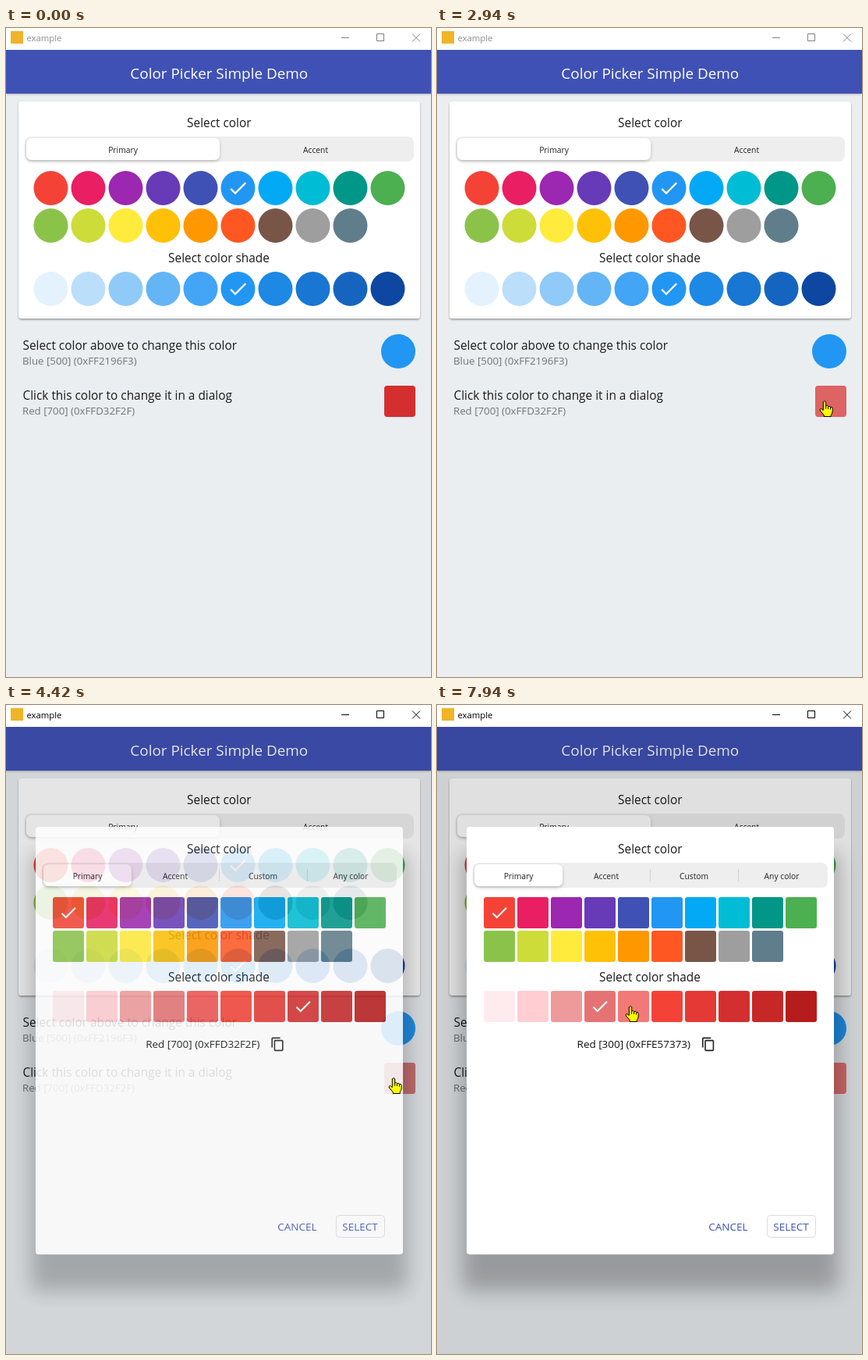
Animation of 545 by 831 pixels, one loop 8000 ms. Source, as an HTML page:

```html
<!DOCTYPE html>
<html lang="en">
<head>
<meta charset="utf-8">
<title>Color Picker Simple Demo</title>
<style>
  html, body { margin: 0; width: 100%; height: 100%; overflow: hidden; background: #eaeef1; }
  svg { display: block; width: 545px; height: 831px; font-family: "Open Sans", "Noto Sans", sans-serif; }
  .title { font-size: 18.9px; font-weight: 500; fill: #fff; }
  .h { font-size: 15.4px; fill: #1a1a1a; }
  .sub { font-size: 13.25px; fill: #727577; }
  .tab { font-size: 10.3px; fill: #222; }
  .btn { font-size: 13.5px; fill: #3f51b5; }
  .code { font-size: 13.45px; fill: #111; }
  .mid { text-anchor: middle; }
</style>
</head>
<body>
<svg id="stage" viewBox="0 0 545 831"></svg>
<script>
const LOOP = 8000;
const STEP = 78; // ms between screen updates
const OPEN = 4120; // the dialog starts to fade in
const hex = s => s.split(' ').map(c => '#' + c);
const PRIMARY = hex('F44336 E91E63 9C27B0 673AB7 3F51B5 2196F3 03A9F4 00BCD4 009688 4CAF50 ' +
  '8BC34A CDDC39 FFEB3B FFC107 FF9800 FF5722 795548 9E9E9E 607D8B');
const BLUES = hex('E3F2FD BBDEFB 90CAF9 64B5F6 42A5F5 2196F3 1E88E5 1976D2 1565C0 0D47A1');
const REDS = hex('FFEBEE FFCDD2 EF9A9A E57373 EF5350 F44336 E53935 D32F2F C62828 B71C1C');

const easeOut = p => k => 1 - (1 - k) ** p;
const easeIn = p => k => k ** p;
const linear = k => k;

// Each pointer move starts where the one before it ended.
const ENTRY = { x: 533, y: 553 };
const MOVES = [
  { at: 1040, steps: 6, x: 248, y: 488, ease: easeOut(1.3) },
  { at: 1508, steps: 4, x: 181, y: 479, ease: easeOut(1.5) },
  { at: 2070, steps: 11, x: 497, y: 478, ease: easeOut(1.5) },
  { at: 5732, steps: 5, x: 125, y: 388, ease: easeIn(2.1) },
  { at: 6448, steps: 5, x: 208, y: 388, ease: linear },
  { at: 7552, steps: 5, x: 248, y: 386, ease: linear }
];

const text = (x, y, cls, s, more = '') => `<text x="${x}" y="${y}" class="${cls}" ${more}>${s}</text>`;
const rect = (x, y, w, h, r, fill, more = '') =>
  `<rect x="${x}" y="${y}" width="${w}" height="${h}" rx="${r}" fill="${fill}" ${more}/>`;
const place = (x, y, k) => `translate(${x} ${y}) scale(${k}) translate(-12 -12)`;
const tick = (x, y, k, more = '') =>
  `<path d="M9 16.17L4.83 12 3.41 13.41 9 19 21 7 19.59 5.59z" fill="#fff" transform="${place(x, y, k)}" ${more}/>`;
const grid = (list, pitch, cell) =>
  list.map((c, i) => cell(c, pitch * (i % 10), pitch * Math.floor(i / 10))).join('');
const dots = (list, y) => grid(list, 48, (c, dx, dy) =>
  `<circle cx="${57.5 + dx}" cy="${y + dy}" r="22" fill="${c}"/>`);
const tiles = (list, y) => grid(list, 43, (c, dx, dy) => rect(60 + dx, y + dy, 40, 40, 3, c));

const shadow = (id, dy, blur, alpha) =>
  `<filter id="${id}" x="-10%" y="-30%" width="120%" height="180%">
    <feDropShadow dx="0" dy="${dy}" stdDeviation="${blur}" flood-opacity="${alpha}"/></filter>`;

const filters = `<defs>
  ${shadow('bar', 1, 1, 0.28)}${shadow('card', 1.5, 1.3, 0.38)}${shadow('lift', 2, 2, 0.22)}
  <filter id="blur" x="-20%" y="-20%" width="140%" height="140%"><feGaussianBlur stdDeviation="13"/></filter>
</defs>`;

const page = `
  ${rect(0, 0, 545, 831, 0, '#eaeef1')}
  ${rect(0, 28, 545, 56, 0, '#3f51b5', 'filter="url(#bar)"')}
  ${text(273.3, 65, 'title mid', 'Color Picker Simple Demo')}
  ${rect(16, 94, 515, 278, 4, '#fff', 'filter="url(#card)"')}
  ${text(273.3, 127, 'h mid', 'Select color')}
  ${rect(24, 139, 499, 32, 8, '#eee')}
  ${rect(26, 141, 248, 28, 7, '#fff', 'filter="url(#lift)"')}
  ${text(150, 160, 'tab mid', 'Primary')}${text(397, 160, 'tab mid', 'Accent')}
  ${dots(PRIMARY, 205)}${tick(297.5, 205, 1.18)}
  ${text(273, 300, 'h mid', 'Select color shade')}
  ${dots(BLUES, 334)}${tick(297.5, 334, 1.18)}
  ${text(21.5, 412, 'h', 'Select color above to change this color')}
  ${text(21, 431, 'sub', 'Blue [500] (0xFF2196F3)')}
  <circle cx="503" cy="414" r="22" fill="#2196f3"/>
  ${text(21.5, 476, 'h', 'Click this color to change it in a dialog')}
  ${text(21, 495, 'sub', '', 'id="rowCode"')}
  ${rect(485, 458, 40, 40, 4, '#d32f2f', 'id="box"')}
  ${rect(485, 458, 40, 40, 4, '#fff', 'id="boxHover"')}`;

const titleBar = `
  ${rect(0, 0, 545, 28, 0, '#fff')}
  ${rect(6, 4, 16, 16, 0, '#f0b429')}
  ${text(26.5, 17, '', 'example', 'id="winName" font-size="11.3"')}
  <path id="winKeys" fill="none" d="M430 12.5h10M475.5 7.5h9v9h-9zM521 7.5l10 10M531 7.5l-10 10"/>`;

const tabs = ['Primary', 'Accent', 'Custom', 'Any color'];
const dialog = `<g id="dialog">
  ${rect(32, 190, 483, 560, 6, '#000', 'opacity=".26" filter="url(#blur)"')}
  ${rect(38, 156, 471, 547.5, 4, '#fff')}
  ${text(273.3, 190, 'h mid', 'Select color')}
  ${rect(46, 202, 455, 32, 8, '#eee')}
  ${rect(48, 204, 113, 28, 7, '#fff', 'filter="url(#lift)"')}
  <path d="M273.5 210v16M386.5 210v16" stroke="#d2d2d2"/>
  ${tabs.map((s, i) => text(104.5 + 112.5 * i, 223, 'tab mid', s)).join('')}
  ${tiles(PRIMARY, 246)}${tick(80, 266, 1.08)}
  ${text(273, 354, 'h mid', 'Select color shade')}
  ${tiles(REDS, 366)}
  ${rect(60, 366, 40, 40, 3, '#fff', 'id="tileHover"')}
  ${tick(0, 0, 1, 'id="pickTick"')}
  ${text(252.3, 439, 'code mid', '', 'id="code"')}
  <path id="copy" fill="#222" d="M16 1H4c-1.1 0-2 .9-2 2v14h2V3h12V1zm3 4H8c-1.1 0-2 .9-2 2v14c0 1.1.9 2 2 2h11c1.1 0 2-.9 2-2V7c0-1.1-.9-2-2-2zm0 16H8V7h11v14z"/>
  ${text(348.3, 673, 'btn', 'CANCEL')}
  ${rect(423.5, 653.5, 62, 28, 4, 'none', 'stroke="#dcdce0"')}
  ${text(431.3, 673, 'btn', 'SELECT')}
</g>`;

const pointer = `<g fill="#ff0" stroke="#000" stroke-linejoin="round">
  <path id="arrow" d="M.5.5V15.5L4 12.2 6.7 18 9.2 16.9 6.6 11.3H11.5Z"/>
  <g id="hand">
    <path d="M-1.7 1.2Q0-1 1.7 1.2V6.3Q3.4 5.2 4.6 7 6.3 6.2 7.5 7.8 10.2 7.3 10.2 10V13.5Q10 16 8.3 17.8V20H-.8V18.1L-5.6 12.5Q-6.6 10.2-4.4 9.9L-1.7 12Z"/>
    <path d="M1.7 6.3V10.3M4.6 7V10.6M7.5 7.8V11" fill="none"/>
  </g>
</g>`;

const $ = id => document.getElementById(id);
const set = (id, attrs) => { for (const k in attrs) $(id).setAttribute(k, attrs[k]); };

$('stage').innerHTML = filters + page + rect(0, 28, 545, 803, 0, '#000', 'id="dim"') +
  titleBar + dialog + pointer;

const stepsSince = (t, start) => Math.floor((t - start) / STEP + 0.2);

function pointAt(t) {
  let i = MOVES.length - 1;
  while (i > 0 && MOVES[i].at > t) i--;
  const from = MOVES[i - 1] || ENTRY, to = MOVES[i];
  const k = to.ease(Math.max(0, Math.min(1, stepsSince(t, to.at) / to.steps)));
  return { x: from.x + (to.x - from.x) * k, y: from.y + (to.y - from.y) * k };
}

// What lies under the pointer: a shade index, 'box' or null.
function targetAt(t) {
  const { x, y } = pointAt(t);
  if (x >= 485 && x <= 525 && y >= 458 && y <= 498) return 'box';
  const i = Math.floor((x - 60) / 43);
  const inside = y >= 366 && y <= 406 && i >= 0 && i < 10 && x - 60 - 43 * i <= 40;
  return inside ? i : null;
}

function drawColors(t, fade) {
  const pick = t < 6370 ? 7 : t < 7160 ? 1 : 3;
  const label = `Red [${pick * 100}] (0xFF${REDS[pick].slice(1)})`;
  $('code').textContent = $('rowCode').textContent = label;
  const right = 252.3 + $('code').getComputedTextLength() / 2;
  set('copy', { transform: `translate(${right + 13.4} 424.8) scale(.8)` });
  set('box', { fill: REDS[pick] });
  set('pickTick', { transform: place(80 + 43 * pick, 386, 1.08), fill: pick < 3 ? '#000' : '#fff' });

  // Highlights trail the pointer by one update.
  const lit = targetAt(t - STEP);
  const pressed = fade > 0;
  set('boxHover', {
    fill: pressed ? '#ccc' : '#fff',
    opacity: lit !== 'box' || fade === 1 ? 0 : pressed ? 0.45 : 0.25
  });
  const tile = Number.isInteger(lit) ? lit : -1;
  set('tileHover', {
    x: 60 + 43 * tile,
    fill: tile < 3 ? '#000' : '#fff',
    opacity: tile < 0 ? 0 : tile < 3 ? 0.055 : 0.22
  });
}

function drawPointer(t) {
  const { x, y } = pointAt(t);
  const now = targetAt(t);
  const hand = now !== null && now === targetAt(t - STEP);
  const shown = t >= MOVES[0].at;
  set('arrow', { transform: `translate(${x} ${y})`, opacity: +(shown && !hand) });
  set('hand', { transform: `translate(${x} ${y - 0.5})`, opacity: +(shown && hand) });
}

function draw(t) {
  const active = t >= OPEN;
  const fade = active ? Math.min(1, (stepsSince(t, OPEN) + 0.25) / 5) : 0;
  set('winName', { fill: active ? '#000' : '#8e8e8e' });
  set('winKeys', { stroke: active ? '#000' : '#808080' });
  set('dim', { opacity: 0.12 * fade });
  set('dialog', { opacity: fade });
  drawColors(t, fade);
  drawPointer(t);
}

let start;
function frame(now) {
  start ??= now;
  draw((now - start) % LOOP);
  requestAnimationFrame(frame);
}
draw(0);
requestAnimationFrame(frame);
</script>
</body>
</html>
```
